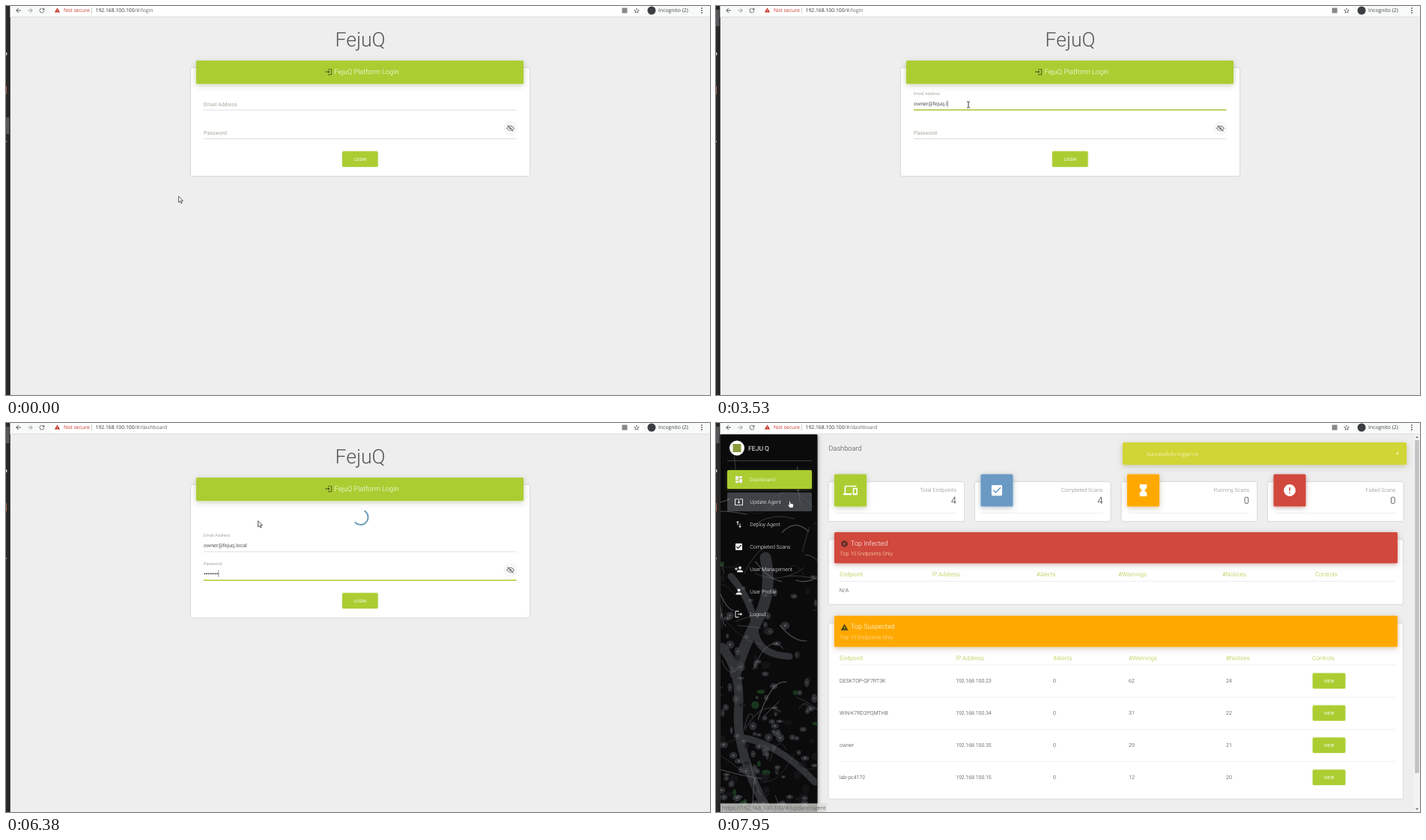
Write an HTML page that moves like this. It is 940x520 px and loops after 8 s.

```html
<!DOCTYPE html>
<html lang="en">
<head>
<meta charset="utf-8">
<title>Login walkthrough</title>
<style>
html, body { margin: 0; width: 100%; height: 100%; overflow: hidden; background: #eee; }
svg { display: block; font-family: Roboto, sans-serif; text-rendering: geometricPrecision; }
.ui { font-family: "Open Sans", "Noto Sans", sans-serif; }
.card { filter: drop-shadow(0 .6px 1.2px rgba(0,0,0,.2)); }
</style>
</head>
<body>
<svg id="stage" width="940" height="520" viewBox="0 0 940 520"></svg>
<script>
const LOOP = 8000;
const GREEN = '#abcd32', RED = '#d1483d', ORANGE = '#ffa900', BLUE = '#6a9ac4';
const EMAIL = 'owner@fejuq.local';
const EMAIL_KEYS = [1250, 1430, 1630, 1810, 1990, 2310, 2490, 2660, 2840, 2990, 3090, 3320, 3530, 3690, 3890, 4020, 4180];
const PASS_KEYS = [4990, 5100, 5290, 5440, 5560, 5680, 5790, 5950];

const ICONS = {
  dashboard: 'M3 13h8V3H3v10zm0 8h8v-6H3v6zm10 0h8V11h-8v10zm0-18v6h8V3h-8z',
  update: 'M12 16.5l4-4h-3v-9h-2v9H8l4 4zm9-13h-6v2h6v14H3v-14h6v-2H3c-1.1 0-2 .9-2 2v14c0 1.1.9 2 2 2h18c1.1 0 2-.9 2-2v-14c0-1.1-.9-2-2-2z',
  deploy: 'M9 3L5 7h3v7h2V7h3L9 3zm7 14v-7h-2v7h-3l4 4 4-4h-3z',
  check: 'M19 3H5c-1.1 0-2 .9-2 2v14c0 1.1.9 2 2 2h14c1.1 0 2-.9 2-2V5c0-1.1-.9-2-2-2zm-9 14l-5-5 1.4-1.4L10 14.2l7.6-7.6L19 8l-9 9z',
  addUser: 'M15 12a4 4 0 1 0 0-8 4 4 0 0 0 0 8zm-9-2V7H4v3H1v2h3v3h2v-3h3v-2H6zm9 4c-2.7 0-8 1.3-8 4v2h16v-2c0-2.7-5.3-4-8-4z',
  user: 'M12 12a4 4 0 1 0 0-8 4 4 0 0 0 0 8zm0 2c-2.7 0-8 1.3-8 4v2h16v-2c0-2.7-5.3-4-8-4z',
  logout: 'M17 8l-1.4 1.4 1.6 1.6H9v2h8.2l-1.6 1.6L17 16l4-4zM4 5h8V3H4c-1.1 0-2 .9-2 2v14c0 1.1.9 2 2 2h8v-2H4z',
  devices: 'M4 6h18V4H4c-1.1 0-2 .9-2 2v11H0v3h14v-3H4V6zm19 2h-6a1 1 0 0 0-1 1v10a1 1 0 0 0 1 1h6a1 1 0 0 0 1-1V9a1 1 0 0 0-1-1zm-1 9h-4v-7h4v7z',
  hourglass: 'M6 2v6l4 4-4 4v6h12v-6l-4-4 4-4V2z',
  error: 'M12 2a10 10 0 1 0 0 20 10 10 0 0 0 0-20zm1 15h-2v-2h2v2zm0-4h-2V7h2v6z',
  warning: 'M1 21h22L12 2 1 21zm12-3h-2v-2h2v2zm0-4h-2v-4h2v4z',
  login: 'M10 17l5-5-5-5v4H1v2h9zM10 3h9a2 2 0 0 1 2 2v14a2 2 0 0 1-2 2h-9v-2h9V5h-9z',
  star: 'M12 2l3 7 7.5.7-5.7 5 1.7 7.3L12 18.2 5.5 22l1.7-7.3-5.7-5L9 9zM12 6l-1.8 4.3-4.6.4 3.5 3-1 4.5L12 15.8l3.9 2.4-1-4.5 3.5-3-4.6-.4z',
  reload: 'M17.6 6.4A8 8 0 1 0 19.7 14h-2a6 6 0 1 1-1.5-6.2L13 11h7V4z',
  back: 'M20 11H7.8l5.6-5.6L12 4l-8 8 8 8 1.4-1.4L7.8 13H20z'
};

const rect = (x, y, w, h, fill, extra = '') => `<rect x="${x}" y="${y}" width="${w}" height="${h}" fill="${fill}" ${extra}/>`;
const text = (x, y, size, fill, s, extra = '') => `<text x="${x}" y="${y}" font-size="${size}" fill="${fill}" ${extra}>${s}</text>`;
const light = (x, y, size, fill, s, extra = '') => text(x, y, size, fill, s, 'font-weight="300" ' + extra);
const icon = (name, cx, cy, size, fill, flip = 1) =>
  `<path d="${ICONS[name]}" fill="${fill}" transform="translate(${cx} ${cy}) scale(${flip * size / 24} ${size / 24}) translate(-12 -12)"/>`;
const card = (x, y, w, h) => rect(x, y, w, h, '#fff', 'rx="2" class="card"');
// Soft dark halo plus a tighter glow in the block's own colour.
const raised = (x, y, w, h, fill) =>
  rect(x, y, w, h, fill, `rx="1.5" style="filter:drop-shadow(0 1.5px 2px ${fill}55) drop-shadow(0 2px 4px rgba(0,0,0,.16))"`);
const MID = 'text-anchor="middle"', END = 'text-anchor="end"';
const button = (x, y, w, label) =>
  rect(x, y, w, 20.6, GREEN, `rx="1.5" style="filter:drop-shadow(0 .6px 1px ${GREEN}88)"`) +
  text(x + w / 2, y + 12.4, 5.8, '#fff', label, MID);

function desktopEdge() {
  return rect(0, 0, 5.5, 520, '#2b2927') + rect(4.5, 0, 1, 520, '#1c1b1a') +
    rect(0, 149, 4.5, 22, '#57565a', 'id="launcher"') +
    '<circle cx="-1" cy="64" r="2.5" fill="#ddd"/>' + rect(0, 107, 1, 11, '#a9664a') + rect(0, 180, 1, 2, '#99a');
}

function toolbar() {
  return '<g class="ui">' + rect(5.5, 0, 935, 15, '#f8f9f9') + rect(58, 0, 792, 12.5, '#fff', 'rx="6"') +
    rect(5.5, 14.4, 935, .8, '#d8d8d8') +
    icon('back', 16.5, 6, 10, '#555') + icon('back', 32.5, 6, 10, '#a0a0a0', -1) + icon('reload', 48, 6, 10, '#555') +
    icon('warning', 68.5, 5.5, 8, '#c8372d') + text(77, 8.4, 6.9, '#c8372d', 'Not secure') +
    rect(114.2, 2, .7, 8, '#bbb') +
    text(119.5, 8.4, 6.8, '#333', '192.168.100.100<tspan id="route" fill="#666"></tspan>') +
    rect(822.5, 2.5, 7, 7, '#888') + icon('star', 842, 6, 9, '#555') +
    '<circle cx="862" cy="6" r="5.5" fill="#3a3d41"/>' + text(871, 8.4, 6.9, '#444', 'Incognito (2)') +
    [3, 6, 9].map(y => `<circle cx="929" cy="${y}" r=".9" fill="#555"/>`).join('') + '</g>';
}

function field(id, label, lineY) {
  return rect(264, lineY - .4, 417.5, .8, '#d4d4d4') + rect(264, lineY - .9, 0, 1.5, GREEN, `id="${id}Line"`) +
    text(264, 0, 7, '#aaa49a', label, `id="${id}Label"`);
}

function loginPage() {
  return '<g id="login">' + light(473, 54.3, 26.5, '#555', 'FejuQ', MID) +
    rect(247, 83, 452, 144, '#fff', 'id="loginCard" rx="2" class="card"') + raised(254, 73, 437, 31, GREEN) +
    icon('login', 431, 88, 11, '#4d5426') + light(438.5, 91, 9.3, '#fff', 'FejuQ Platform Login') +
    '<path id="spinner" d="M478.5 117.3A10 10 0 1 1 465.8 132.4" fill="none" stroke="#6a9ab8" stroke-width="2"/>' +
    '<g id="form">' + field('email', 'Email Address', 139) + field('pass', 'Password', 177.4) +
    text(264, 133, 7, '#555', '', 'id="emailText"') + '<g id="dots"></g>' + rect(0, 0, .7, 8.5, '#555', 'id="caret"') +
    '<circle cx="673.5" cy="163.5" r="7.5" fill="#fff" class="card"/>' +
    '<g fill="none" stroke="#777" stroke-width="1.1"><path d="M668.5 163.5q5-6.5 10 0q-5 6.5-10 0z"/><path d="M669.5 159.5l8 8"/></g>' +
    '<circle cx="673.5" cy="163.5" r="1.5" fill="#777"/>' +
    button(449, 194.3, 47.5, 'LOGIN') + '</g></g>';
}

function seeded(seed) {
  return () => (seed = (seed * 16807) % 2147483647) / 2147483647;
}

// Branching grey tissue, round cells and thin pale fibres on black.
function sidebarArt() {
  const rnd = seeded(77), between = (a, b) => +(a + (b - a) * rnd()).toFixed(1);
  let art = '<g fill="none" stroke="#3a3d40" stroke-linecap="round" opacity=".8">' +
    '<path d="M66 180Q76 225 56 262T26 335" stroke-width="15"/><path d="M20 205Q50 240 52 275T98 312" stroke-width="9"/>' +
    '<path d="M8 300Q34 330 30 385T70 520" stroke-width="12"/><path d="M30 420Q80 425 132 480" stroke-width="9"/></g>';
  for (let i = 0; i < 150; i++) {
    const y = 180 + 340 * Math.sqrt(rnd()), x = 5 + 130 * rnd() ** (y < 360 ? 1.8 : 1);
    const r = between(2, 6), fill = i % 18 ? (i % 3 ? '#424548' : '#1b1c1e') : '#24552c';
    art += `<ellipse cx="${x.toFixed(1)}" cy="${y.toFixed(1)}" rx="${r}" ry="${between(2, 6)}" fill="${fill}" opacity=".6"/>`;
    if (i % 3) art += `<circle cx="${x.toFixed(1)}" cy="${y.toFixed(1)}" r="${(r / 4).toFixed(1)}" fill="#5d6063"/>`;
  }
  for (let i = 0; i < 55; i++) {
    const dx = between(-70, 70), dy = between(-50, 50);
    art += `<path d="M${between(5, 135)} ${between(60, 520)}q${dx / 2} ${between(-25, 25)} ${dx} ${dy}" fill="none" ` +
      `stroke="#7a7d80" stroke-width="${between(.5, 1.3)}" opacity="${between(.25, .65)}"/>`;
  }
  return art;
}

function sidebar() {
  const items = [['dashboard', 'Dashboard'], ['update', 'Update Agent'], ['deploy', 'Deploy Agent'], ['check', 'Completed Scans'],
    ['addUser', 'User Management'], ['user', 'User Profile'], ['logout', 'Logout']];
  return '<clipPath id="side"><rect x="5.5" y="15" width="130" height="505"/></clipPath>' +
    raised(5.5, 15, 130, 505, '#0b0b0c') + `<g clip-path="url(#side)">${sidebarArt()}</g>` +
    '<circle cx="28" cy="33.5" r="10" fill="#fff"/>' + rect(22.5, 28, 11, 11, '#8c9a3c') +
    text(43, 36.7, 8.6, '#fff', 'FEJU Q') + rect(15, 50, 113, .7, '#fff', 'opacity=".3"') +
    raised(15, 63, 113, 25, GREEN) + rect(15, 93, 113, 25, '#b9c5cf', 'id="hover" rx="1.5"') +
    items.map(([name, label], i) => icon(name, 30.5, 75.5 + 30 * i, 12, '#eee') + light(45.3, 78 + 30 * i, 7, '#fff', label)).join('');
}

function statCard(i, name, color, label, value) {
  const x = 150.5 + 195.5 * i;
  return card(x, 79, 180.5, 52) + raised(x + 7.5, 68.5, 43, 43, color) + icon(name, x + 29, 90, 19, '#fff') +
    light(x + 170.5, 91.5, 7.2, '#888', label, END) + light(x + 170.5, 108, 13, '#3c3c3c', value, END) +
    rect(x + 10, 120, 160.5, .7, '#e8e8e8');
}

function panel(y, h, color, title, cols) {
  const names = ['Endpoint', 'IP Address', '#Alerts', '#Warnings', '#Notices', 'Controls'];
  return card(150.5, y + 10, 766.5, h) + raised(158, y, 752, 41.5, color) +
    light(180, y + 17.5, 9, '#fff', title) + light(165.5, y + 31, 7.2, '#fbe6bd', 'Top 10 Endpoints Only') +
    names.map((s, i) => light(cols[i], y + 59, 8.1, '#a9c535', s)).join('') + rect(165, y + 65, 742, .7, '#e6e6e6');
}

function dashboard() {
  const cols = [165, 320, 450, 551, 681, 796];
  const rows = [['DESKTOP-QF7RT3K', '192.168.100.23', 0, 62, 24], ['WIN-K7RD2PQMTHB', '192.168.100.34', 0, 31, 22],
    ['owner', '192.168.100.35', 0, 29, 21], ['lab-pc4172', '192.168.100.15', 0, 12, 20]];
  const table = rows.map((row, r) => {
    const y = 344.5 + 43 * r;
    return row.map((s, i) => light(cols[i], y + 2.5, 7, '#333', s)).join('') + button(796.7, y - 10, 43.6, 'VIEW') +
      (r < 3 ? rect(165, y + 21.5, 742, .7, '#ebebeb') : '');
  }).join('');
  return '<g id="dash">' + sidebar() + light(150.5, 36.5, 9.2, '#444', 'Dashboard') +
    statCard(0, 'devices', GREEN, 'Total Endpoints', 4) + statCard(1, 'check', BLUE, 'Completed Scans', 4) +
    statCard(2, 'hourglass', ORANGE, 'Running Scans', 0) + statCard(3, 'error', RED, 'Failed Scans', 0) +
    panel(146, 86, RED, 'Top Infected', [165, 288, 428, 537, 676, 800]) +
    '<circle cx="171.5" cy="161.5" r="2.6" fill="none" stroke="#5b3028" stroke-width="2"/>' +
    '<circle cx="171.5" cy="161.5" r="4" fill="none" stroke="#5b3028" stroke-width="1.2" stroke-dasharray="2 1.14"/>' +
    light(165, 225.5, 7, '#333', 'N/A') +
    panel(257.7, 234.5, ORANGE, 'Top Suspected', cols) + icon('warning', 171.5, 273, 11, '#4c4a1c') + table +
    raised(543, 26, 379, 29.7, '#d1d535') + light(575, 43.5, 7.1, '#fffde0', 'Successfully loggen in') + text(910, 42.7, 7.5, '#fff', '×', MID) +
    rect(932, 15, 8, 505, '#f3f3f3') + rect(933.2, 23, 5.6, 445, '#c2c2c2') +
    '<path d="M934 20l2-2.500 2 2.500zM934 515l2 2.500 2-2.500z" fill="#777"/>' +
    '<g id="status" class="ui">' + rect(5.5, 508.5, 142.5, 11.5, '#dcdcd8', 'opacity=".75"') +
    text(8, 517, 7.4, '#6a6a68', 'https://192.168.100.100/#/update/agent') + '</g></g>';
}

function pointers() {
  const body = 'fill="#fff" stroke="#333" stroke-width=".8" stroke-linejoin="round"';
  return `<path id="arrow" d="M0 0v8l1.9-1.7 1.3 3 1.4-.6-1.3-2.9h2.6z" ${body}/>` +
    '<path id="beam" d="M-2-4h1.500l.5.5.5-.5h1.500M0-3.500v7M-2 4h1.500l.5-.5.5.5h1.500" fill="none" stroke="#333" stroke-width="1"/>' +
    `<path id="hand" d="M-.6-1.2q1.100-1 1.600.4l.5 2.600 3.200.8q1.200.4.9 2l-.8 3.400h-4.300l-2.700-3.700q0-1.400 1.800-.4z" ${body}/>`;
}

document.getElementById('stage').innerHTML = rect(0, 0, 940, 520, '#eee') + loginPage() + dashboard() + desktopEdge() + toolbar() + pointers();
const $ = {};
document.querySelectorAll('[id]').forEach(el => $[el.id] = el);

const set = (id, attrs) => { for (const k in attrs) $[id].setAttribute(k, attrs[k]); };
const show = (id, on) => set(id, { visibility: on ? 'visible' : 'hidden' });
const clamp = v => Math.max(0, Math.min(1, v));
const smooth = u => u * u * (3 - 2 * u);
const mix = (a, b, u) => a + (b - a) * u;
const typed = (keys, t) => keys.filter(k => k <= t).length;
// Progress in n equal jumps, the first at a and the last at b.
const stepped = (t, a, b, n) => t < a ? 0 : Math.min(n, Math.floor((t - a) / (b - a) * (n - 1) + 1e-6) + 1) / n;

function updateField(id, baseline, raise, focus) {
  set(id + 'Label', { y: baseline - 14.4 * raise, 'font-size': 7 - 1.5 * raise });
  set(id + 'Line', { x: 264 + 208.75 * (1 - focus), width: 417.5 * focus });
}

function updateForm(t) {
  const enter = smooth(stepped(t, 610, 930, 6)), tab = smooth(stepped(t, 4690, 4930, 6));
  updateField('email', 133.5, enter, enter * (1 - tab));
  updateField('pass', 171.5, tab, tab);

  const chars = typed(EMAIL_KEYS, t), dots = typed(PASS_KEYS, t);
  $.emailText.textContent = EMAIL.slice(0, chars);
  $.dots.innerHTML = Array.from({ length: dots }, (_, i) => `<circle cx="${265.3 + 2.42 * i}" cy="168.4" r=".85" fill="#333"/>`).join('');

  const onPass = t >= 4690;
  const emailEnd = chars ? $.emailText.getComputedTextLength() : 0;
  set('caret', { x: 264.2 + (onPass ? 2.42 * dots : emailEnd), y: onPass ? 164.3 : 126.3 });
  show('caret', t >= 610 && !(t >= 1170 && t < 1250));

  const loading = t >= 6230;
  set('form', { transform: `translate(0 ${loading ? 33 : 0})` });
  set('loginCard', { height: loading ? 177 : 144 });
  set('spinner', { transform: `rotate(${(Math.floor((t - 6230) / 50) - 3) * 18} 473.5 126)` });
  $.spinner.style.display = loading ? '' : 'none';
}

function updatePointer(t) {
  const arrive = smooth(stepped(t, 50, 450, 10)), leave = smooth(stepped(t, 7180, 7950, 17));
  let x = mix(230.5, 337, arrive), y = mix(254.5, 132, arrive);
  if (t >= 6280) {
    x = mix(336.5, 98, leave);
    y = mix(130.8, 105.5, leave);
  }
  const shape = t >= 6280 ? (x < 128 ? 'hand' : 'arrow') : (y < 140 ? 'beam' : 'arrow');
  for (const id of ['arrow', 'beam', 'hand']) {
    set(id, { transform: `translate(${x} ${y})` });
    show(id, id === shape);
  }
}

function draw(t) {
  const inside = t >= 6430;
  $.login.style.display = inside ? 'none' : '';
  $.dash.style.display = inside ? '' : 'none';
  if (!inside) updateForm(t);
  updatePointer(t);
  set('launcher', { y: t < 690 ? 149 : 5 });
  $.route.textContent = t < 6330 ? '/#/login' : '/#/dashboard';
  set('hover', { opacity: .3 * clamp((t - 7770) / 150) });
  set('status', { opacity: clamp((t - 7850) / 90) });
}

const start = performance.now();
function tick() {
  draw((performance.now() - start) % LOOP);
  requestAnimationFrame(tick);
}
tick();
</script>
</body>
</html>
```
